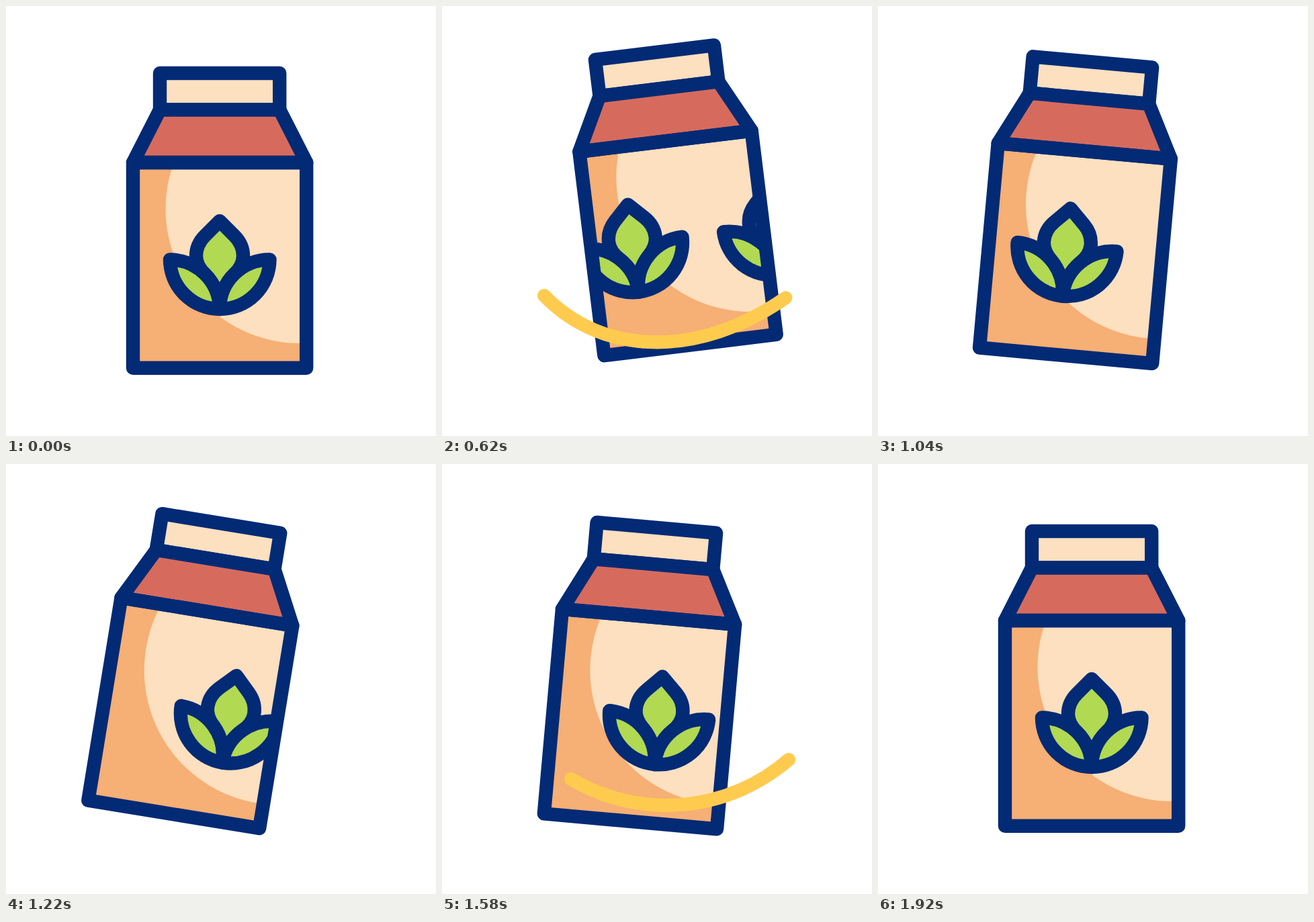
An HTML page that plays this animation: 640 by 640 pixels, repeating every 2600 ms.

```html
<!DOCTYPE html>
<html lang="en">
<head>
<meta charset="utf-8">
<title>Carton</title>
<style>
  html, body { margin: 0; width: 100%; height: 100%; overflow: hidden; background: #fff; }
  svg { display: block; width: 100%; height: 100%; }
  .line { stroke: #032a75; stroke-width: 20.4; stroke-linejoin: round; stroke-linecap: round; }
  .swoosh { fill: none; stroke: #ffcb4f; stroke-width: 20; stroke-linecap: round; }
</style>
</head>
<body>
<svg viewBox="0 0 640 640">
  <defs>
    <clipPath id="front"><path d="M189 233H447.2V538.7H189Z"/></clipPath>
    <g id="leaf" class="line" fill="#b1d952">
      <path d="M318 320L296 342C287 351 283 361 283 372C283 382 288 391 296 399A74 74 0 0 1 318 451A74 74 0 0 1 340 399C348 391 353 382 353 372C353 361 349 351 340 342Z"/>
      <path d="M244 377.5A74 74 0 0 1 318 451A74 74 0 0 1 244 377.5Z"/>
      <path d="M392.5 377.5A74 74 0 0 0 318 451A74 74 0 0 0 392.5 377.5Z"/>
    </g>
  </defs>
  <g id="carton">
    <g clip-path="url(#front)">
      <path d="M189 233H447.2V538.7H189Z" fill="#f6af74"/>
      <circle cx="437.5" cy="302" r="200" fill="#fce0bf"/>
      <use class="leaf" href="#leaf"/>
      <use class="leaf" href="#leaf"/>
      <use class="leaf" href="#leaf"/>
    </g>
    <g class="line">
      <path d="M229 100H407.2V154.5H229Z" fill="#fce0bf"/>
      <path d="M229 154.5H407.2L447.2 233H189Z" fill="#d66b5d"/>
      <path d="M189 233H447.2V538.7H189Z" fill="none"/>
    </g>
  </g>
  <path class="swoosh" pathLength="1" d="M152 431C240 522 385 525 516 431"/>
  <path class="swoosh" pathLength="1" d="M516 440A277.6 277.6 0 0 1 152 440"/>
</svg>
<script>
  const LOOP = 2600;
  const PIVOT = { x: 318, y: 114 };
  const LEAF_HOME = [0, -210.5, -434];
  const SWOOSH_START = [400, 1400];

  // Keys: [time, value, initial push of the ease that leads to this key]
  const TILT = [[260, 0], [740, -8, 0.17], [1320, 9.9, 0.58], [1920, 0, 0.2]];
  const LIFT = [[260, 0], [740, -36, 0.1], [1320, -11, 0.68], [1920, 0, 0.3]];
  const SLIDE = [[260, 0], [1320, 505, 0.035], [1800, 434, 0.1]];

  const carton = document.getElementById('carton');
  const leaves = [...document.querySelectorAll('.leaf')];
  const swooshes = [...document.querySelectorAll('.swoosh')];

  function ease(u, push) {
    const s = Math.min(1, Math.max(0, u)), r = 1 - s;
    return 3 * r * r * s * push + 3 * r * s * s + s * s * s;
  }

  function track(keys, t) {
    let value = keys[0][1];
    for (let i = 1; i < keys.length; i++) {
      const [from, start] = keys[i - 1];
      const [to, end, push] = keys[i];
      value += (end - start) * ease((t - from) / (to - from), push);
    }
    return value;
  }

  function drawSwoosh(path, t) {
    const head = ease(t / 240, 0.2);
    const tail = ease((t - 240) / 270, 0.2);
    path.style.display = head > tail ? '' : 'none';
    path.setAttribute('stroke-dasharray', `${head - tail} 2`);
    path.setAttribute('stroke-dashoffset', -tail);
  }

  function draw(t) {
    carton.setAttribute('transform',
      `translate(0 ${track(LIFT, t)}) rotate(${track(TILT, t)} ${PIVOT.x} ${PIVOT.y})`);
    const slide = track(SLIDE, t);
    leaves.forEach((leaf, i) => leaf.setAttribute('x', LEAF_HOME[i] + slide));
    swooshes.forEach((path, i) => drawSwoosh(path, t - SWOOSH_START[i]));
  }

  const begin = performance.now();
  function tick() {
    draw((performance.now() - begin) % LOOP);
    requestAnimationFrame(tick);
  }
  tick();
</script>
</body>
</html>
```
